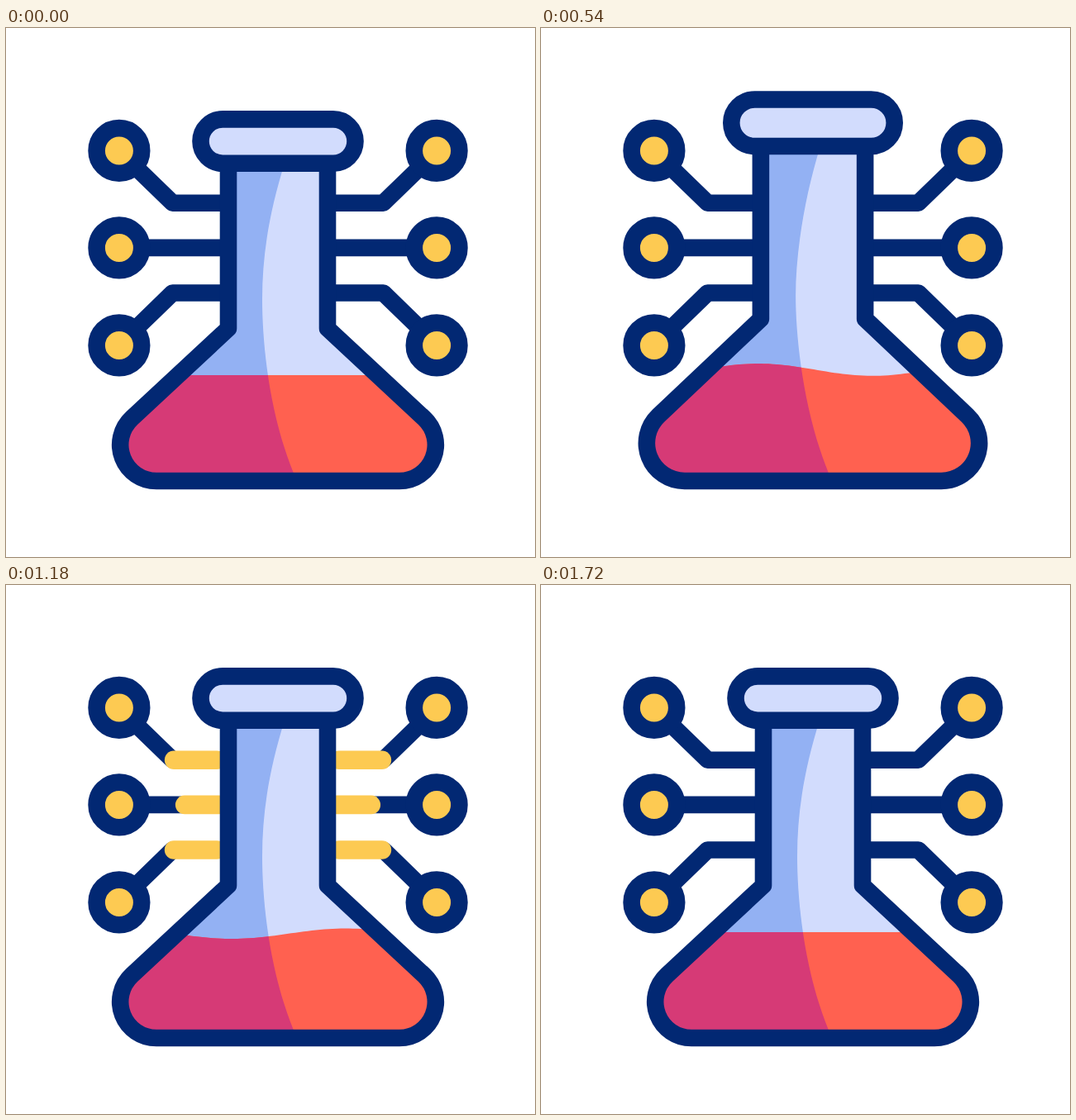
These frames come from a looping animation (640x640 px, 1920 ms). An HTML page:

```html
<!DOCTYPE html>
<html lang="en">
<head>
<meta charset="utf-8">
<title>Flask network</title>
<style>
  html, body { margin: 0; width: 100%; height: 100%; overflow: hidden; background: #fff; }
  svg { display: block; width: 100vw; height: 100vh; }
  .ink { stroke: #022873; stroke-width: 20.6; stroke-linecap: round; stroke-linejoin: round; }
  .pulse { fill: none; stroke: #fdca52; stroke-width: 22.6; stroke-linecap: round; stroke-linejoin: round; }
</style>
</head>
<body>
<svg viewBox="0 0 640 640">
  <defs>
    <clipPath id="inside"><path id="insidePath"/></clipPath>
    <clipPath id="shaded"><path id="shadedPath"/></clipPath>
  </defs>
  <g id="net"></g>
  <g clip-path="url(#inside)">
    <rect width="640" height="640" fill="#d2dcfd"/>
    <path id="shade" fill="#93b1f3"/>
    <path id="liquid" fill="#ff6150"/>
    <g clip-path="url(#shaded)"><path id="darkLiquid" fill="#d63a76"/></g>
  </g>
  <path id="body" class="ink" fill="none"/>
  <rect id="cap" class="ink" fill="#d2dcfd"/>
</svg>
<script>
const LOOP = 1920, MID = 329;
const $ = id => document.getElementById(id);
const mix = (a, b, k) => a + (b - a) * k;
const ramp = (t, from, to) => {
  const s = Math.min(1, Math.max(0, (t - from) / (to - from)));
  return s * s * (3 - 2 * s);
};

function add(parent, tag, attrs) {
  const el = document.createElementNS('http://www.w3.org/2000/svg', tag);
  set(el, attrs);
  parent.appendChild(el);
  return el;
}
function set(el, attrs) {
  for (const k in attrs) el.setAttribute(k, attrs[k]);
}

// One branch per row: wire, node circle, pulse; dy is the side the node grows to.
const rows = [
  { y: 148.4, dy: -1, start: 1386, wire: 'M269 211.7H201.5L156.1 167.7' },
  { y: 265.9, dy: 0, start: 1413, wire: 'M269 265.9H164.2' },
  { y: 383.9, dy: 1, start: 1350, wire: 'M269 320.5H201.5L156.1 364.6' }
];
const branches = [];
for (const flip of [false, true]) {
  const side = add($('net'), 'g', flip ? { transform: `translate(${2 * MID} 0) scale(-1 1)` } : {});
  for (const row of rows) {
    add(side, 'path', { class: 'ink', fill: 'none', d: row.wire });
    const node = add(side, 'circle', { class: 'ink', fill: '#fdca52' });
    const pulse = add(side, 'path', { class: 'pulse', d: row.wire, pathLength: 1 });
    branches.push({ row, node, pulse });
  }
}

function drawNet(t) {
  const head = ramp(t, 980, 1380), tail = ramp(t, 1100, 1500);
  const span = head - tail;
  for (const { row, node, pulse } of branches) {
    const grow = 4.3 * (ramp(t, row.start, row.start + 150) - ramp(t, row.start + 150, row.start + 300));
    set(node, { cx: 136.9 - grow, cy: row.y + row.dy * grow, r: 27.3 + grow });
    set(pulse, {
      visibility: span > 0.002 ? 'visible' : 'hidden',
      'stroke-dasharray': `${span} 3`,
      'stroke-dashoffset': -tail
    });
  }
}

function bodyPath(p, top) {
  const neck = mix(269, 264.8, p), bend = mix(363.5, 348.1, p);
  const r = mix(43.8, 46.5, p), cx = mix(138.2, 124.3, p) + r, cy = 548 - r;
  // Tangent from the neck bend to the rounded base corner
  const dx = neck - cx, dy = bend - cy;
  const a = Math.atan2(dy, dx) - Math.acos(r / Math.hypot(dx, dy));
  const tx = cx + r * Math.cos(a), ty = cy + r * Math.sin(a);
  const m = x => 2 * MID - x;
  return `M${neck} ${top}V${bend}L${tx} ${ty}A${r} ${r} 0 0 0 ${cx} 548` +
    `H${m(cx)}A${r} ${r} 0 0 0 ${m(tx)} ${ty}L${m(neck)} ${bend}V${top}`;
}

function shadePath(p, top) {
  const x = mix(310, 307.5, p), y = mix(328, 322, p);
  const startX = mix(337, 338.3, p);
  return `M100 ${top}H${startX}C${startX - 17.5} ${top + 56} ${x} ${y - 56} ${x} ${y}` +
    `S319 473 352 548V570H100Z`;
}

function liquidPath(level, amp, center) {
  let d = 'M100 570';
  for (let x = 100; x <= 560; x += 5) {
    const y = level + amp * Math.sin((x - center) / 138 * Math.PI);
    d += `L${x} ${y.toFixed(2)}`;
  }
  return d + 'V570Z';
}

function drawFlask(t) {
  const up = ramp(t, 200, 710), down = ramp(t, 770, 1170), settle = ramp(t, 1170, 1400);
  const p = up - down;

  const x = mix(235.5, 228.5, p), y = mix(110.4, 78.2, p), bottom = mix(163.8, 135.9, p);
  const h = bottom - y;
  set($('cap'), { x, y, width: 2 * (MID - x), height: h, rx: h / 2 });

  const body = bodyPath(p, bottom), shade = shadePath(p, bottom);
  set($('body'), { d: body });
  set($('insidePath'), { d: body + 'Z' });
  set($('shade'), { d: shade });
  set($('shadedPath'), { d: shade });

  const back = down - settle;
  const surface = liquidPath(420 - 8.8 * p + 1.8 * back, 9.9 * p - 6.3 * back, mix(332, 342, down));
  set($('liquid'), { d: surface });
  set($('darkLiquid'), { d: surface });
}

function frame(now) {
  const t = now % LOOP;
  drawNet(t);
  drawFlask(t);
  requestAnimationFrame(frame);
}
frame(0);
</script>
</body>
</html>
```
